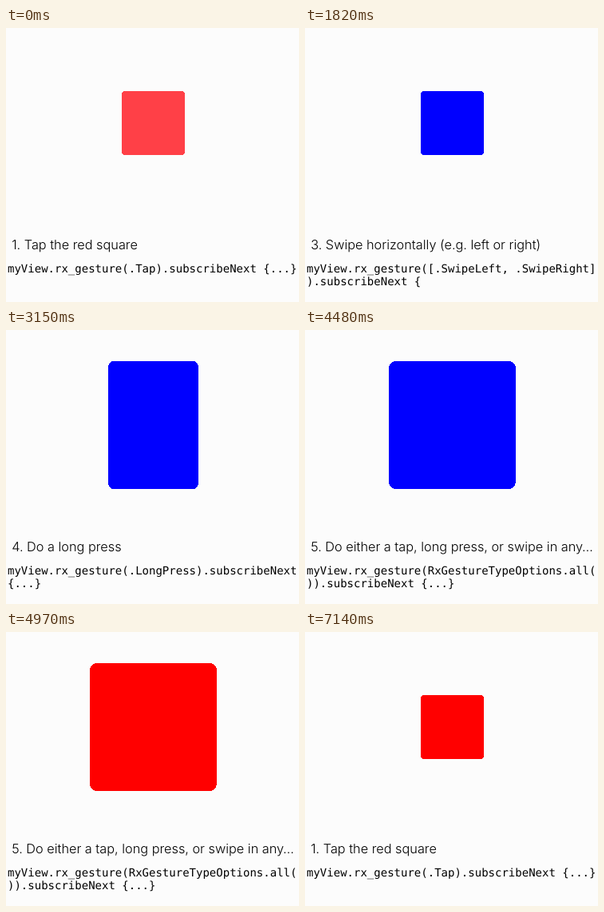
Animation of 367x343 px, one loop 7.98 s. Source, as an HTML page:

```html
<!DOCTYPE html>
<html lang="en">
<head>
<meta charset="utf-8">
<title>Gesture steps</title>
<style>
  html, body { margin: 0; width: 100%; height: 100%; overflow: hidden; background: #fcfcfc; }
  svg { display: block; width: 100%; height: 100%; }
  text { fill: #000; text-rendering: geometricPrecision; }
  #title { font: 300 16.3px Inter, sans-serif; }
  .code { font: 14px "DejaVu Sans Mono", monospace; }
</style>
</head>
<body>
<svg viewBox="0 0 367 343">
  <rect width="367" height="343" fill="#fcfcfc"/>
  <g id="box" shape-rendering="crispEdges">
    <rect x="-39.75" y="-40" width="79.5" height="80" rx="4.5"/>
  </g>
  <text id="title" x="7.2" y="277"></text>
  <text id="code1" class="code" x="2" y="306"></text>
  <text id="code2" class="code" x="2" y="322"></text>
</svg>
<script>
const LOOP = 7980, TICK = 70, DURATION = 500;
const CORAL = [255, 64, 71], BLUE = [0, 0, 255], RED = [255, 0, 0];

// Each step sets its text at once, then eases the box from the previous pose.
const steps = [
  { at: 0, start: 0, end: 0, sx: 1, sy: 1, color: CORAL,
    text: ["1. Tap the red square", "myView.rx_gesture(.Tap).subscribeNext {...}", ""] },
  { at: 910, start: 892, end: 1330, sx: 1, sy: 1, color: BLUE,
    text: ["2. Swipe the square down", "myView.rx_gesture(.SwipeDown).subscribeNext", "{...}"] },
  { at: 1820, start: 1845, end: 2380, sx: 1, sy: 2, color: BLUE,
    text: ["3. Swipe horizontally (e.g. left or right)", "myView.rx_gesture([.SwipeLeft, .SwipeRight]", ").subscribeNext {"] },
  { at: 2940, start: 2920, end: 3430, sx: 2, sy: 2, color: BLUE,
    text: ["4. Do a long press", "myView.rx_gesture(.LongPress).subscribeNext", "{...}"] },
  { at: 4480, start: 4470, end: 4970, sx: 2, sy: 2, color: RED,
    text: ["5. Do either a tap, long press, or swipe in any…", "myView.rx_gesture(RxGestureTypeOptions.all(", ")).subscribeNext {...}"] },
  { at: 6580, start: 6605, end: 7140, sx: 1, sy: 1, color: RED,
    text: ["1. Tap the red square", "myView.rx_gesture(.Tap).subscribeNext {...}", ""] }
];

const box = document.getElementById("box");
const lines = ["title", "code1", "code2"].map(id => document.getElementById(id));
const mix = (a, b, p) => a + (b - a) * p;

// cubic-bezier(.42, 0, .58, 1)
function easeInOut(x) {
  let lo = 0, hi = 1;
  for (let i = 0; i < 24; i++) {
    const s = (lo + hi) / 2, r = 1 - s;
    if (1.26 * r * r * s + 1.74 * r * s * s + s * s * s < x) lo = s;
    else hi = s;
  }
  return lo * lo * (3 - 2 * lo);
}

function progress(step, t) {
  if (t >= step.end) return 1;
  return t <= step.start ? 0 : easeInOut(Math.min(1, (t - step.start) / DURATION));
}

function draw(time) {
  const t = Math.floor((time % LOOP) / TICK) * TICK;
  const i = steps.findLastIndex(step => t >= step.at);
  const step = steps[i], prev = steps[Math.max(0, i - 1)];
  const p = progress(step, t);
  const color = step.color.map((c, k) => Math.round(mix(prev.color[k], c, p)));
  box.setAttribute("transform",
    `translate(184.5 119) scale(${mix(prev.sx, step.sx, p)} ${mix(prev.sy, step.sy, p)})`);
  box.setAttribute("fill", `rgb(${color})`);
  lines.forEach((line, k) => {
    if (line.textContent !== step.text[k]) line.textContent = step.text[k];
  });
}

const origin = performance.now();
function loop() {
  draw(performance.now() - origin);
  requestAnimationFrame(loop);
}
loop();
</script>
</body>
</html>
```
